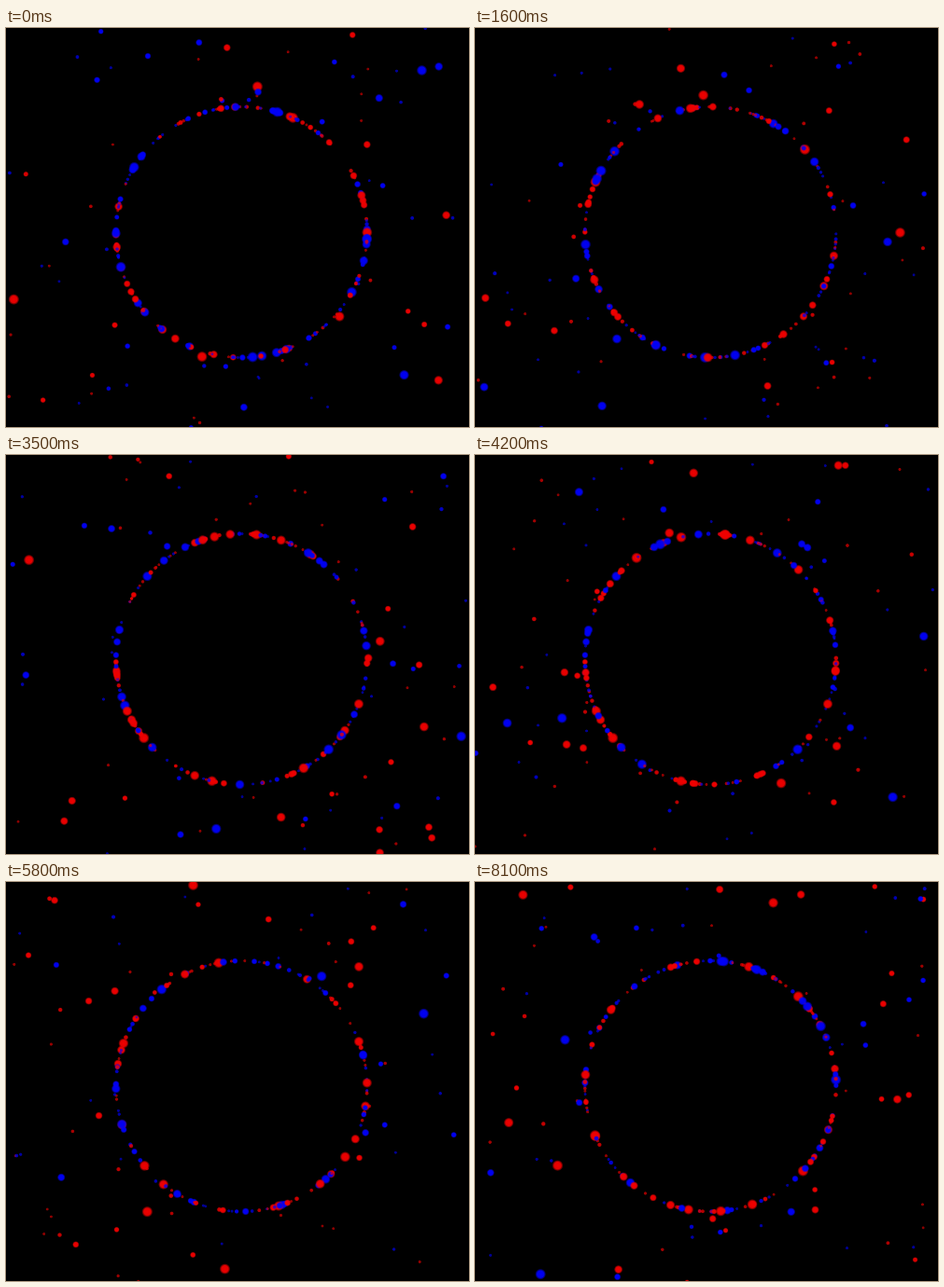
Write an HTML page with a canvas that moves like this. It is 496 by 428 pixels and loops after 8200 ms.

```html
<!DOCTYPE html>
<html lang="en">
<head>
<meta charset="utf-8">
<title>Particle ring</title>
<style>
  html, body { margin: 0; width: 100%; height: 100%; overflow: hidden; background: #000; }
  canvas { display: block; }
</style>
</head>
<body>
<canvas id="stage" width="496" height="428"></canvas>
<script>
const ctx = document.getElementById('stage').getContext('2d');
const W = 496, H = 428, CX = 252.3, CY = 219, RING = 134.5;
const LOOP = 8200, STEP = 100;
const COUNT = 310, SPEED = 0.2, REACH = 200;
const RED = '238, 0, 0', BLUE = '0, 0, 245';

function random(seed) {
  let s = seed | 0;
  return () => {
    s = (s + 0x6D2B79F5) | 0;
    let h = Math.imul(s ^ (s >>> 15), 1 | s);
    h = (h + Math.imul(h ^ (h >>> 7), 61 | h)) ^ h;
    return ((h ^ (h >>> 14)) >>> 0) / 4294967296;
  };
}

const slotRandom = random(71);
const slots = Array.from({ length: COUNT }, () => ({
  wait: 1000 + slotRandom() * 600,
  shift: slotRandom() * 5000
}));

// Soft-edged disc; the smallest ones are dimmer
function dot(x, y, r, rgb) {
  const alpha = Math.min(1, 0.3 + r * 0.28);
  const outer = r + 0.7;
  const fill = ctx.createRadialGradient(x, y, 0, x, y, outer);
  fill.addColorStop(0, `rgba(${rgb}, ${alpha})`);
  fill.addColorStop(0.62, `rgba(${rgb}, ${alpha * 0.95})`);
  fill.addColorStop(1, `rgba(${rgb}, 0.08)`);
  ctx.fillStyle = fill;
  ctx.beginPath();
  ctx.arc(x, y, outer, 0, Math.PI * 2);
  ctx.fill();
}

// Each particle rests on the ring, flies straight out, then starts anew
function drawParticle({ wait, shift }, i, t) {
  const period = wait + REACH / SPEED;
  const clock = t + shift;
  const cycle = Math.floor(clock / period);
  const flight = Math.max(0, clock - cycle * period - wait);
  const rnd = random(i * 977 + cycle * 7919);
  const angle = rnd() * Math.PI * 2;
  const r = 1.1 + 4.2 * rnd() ** 2.6;
  const dist = RING + flight * SPEED;
  const rgb = rnd() < 0.5 ? RED : BLUE;
  dot(CX + Math.cos(angle) * dist, CY + Math.sin(angle) * dist, r, rgb);
}

function draw(t) {
  ctx.fillStyle = '#000';
  ctx.fillRect(0, 0, W, H);
  slots.forEach((slot, i) => drawParticle(slot, i, t));
}

const begin = performance.now();
function tick() {
  const t = (performance.now() - begin) % LOOP;
  draw(Math.floor(t / STEP) * STEP);
  requestAnimationFrame(tick);
}
tick();
</script>
</body>
</html>
```
